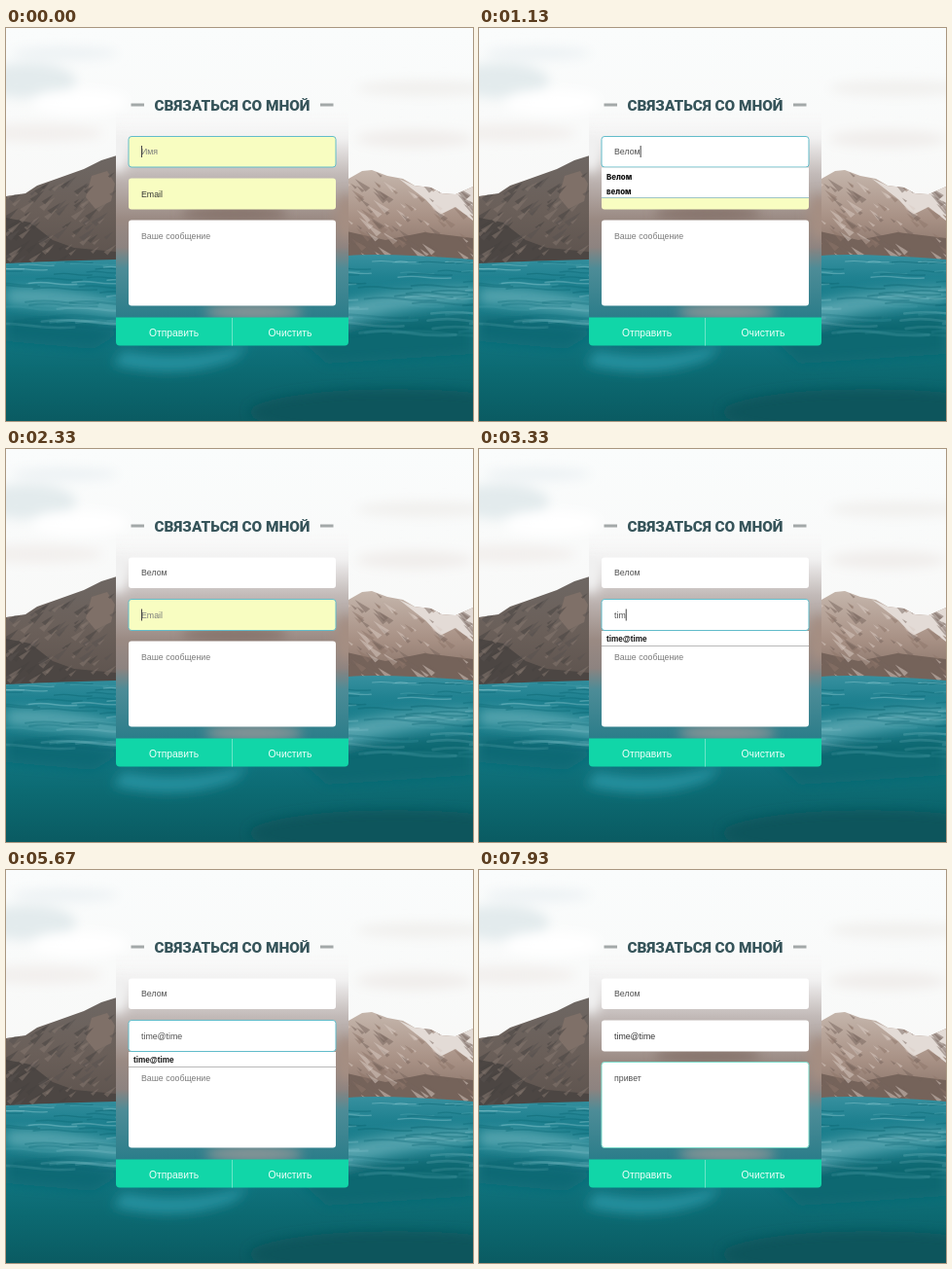
Write an HTML page that moves like this. It is 480 px wide and 404 px high and loops after 8 s.

```html
<!DOCTYPE html>
<html lang="ru">
<head>
<meta charset="utf-8">
<title>Связаться со мной</title>
<style>
html, body { margin: 0; width: 100%; height: 100%; overflow: hidden; background: #fcfcfc; }
svg { display: block; width: 480px; height: 404px; }
text { font: 8.8px "Liberation Sans", Arial, sans-serif; fill: #555; }
.title { font: 800 20px Roboto, "Open Sans", sans-serif; font-stretch: 75%; fill: #36545a; text-anchor: middle; }
.btn { font-size: 10.3px; fill: #effffa; text-anchor: middle; }
.hint { font-weight: 700; font-size: 8.2px; fill: #111; }
.alt { font: 800 7.9px Inter, "Open Sans", sans-serif; }
</style>
</head>
<body>
<svg viewBox="0 0 480 404">
  <defs>
    <linearGradient id="sky" x2="0" y2="1">
      <stop offset="0" stop-color="#fafcfc"/><stop offset=".5" stop-color="#f8f8f7"/><stop offset="1" stop-color="#f4f0ee"/>
    </linearGradient>
    <linearGradient id="sea" x2="0" y2="1">
      <stop offset="0" stop-color="#37909f"/><stop offset=".14" stop-color="#1f8190"/>
      <stop offset=".45" stop-color="#117682"/><stop offset=".7" stop-color="#0c6a72"/><stop offset="1" stop-color="#0a5b62"/>
    </linearGradient>
    <linearGradient id="west" x2="0" y2="1">
      <stop offset="0" stop-color="#6e6763"/><stop offset=".5" stop-color="#6a5f59"/><stop offset="1" stop-color="#5c524d"/>
    </linearGradient>
    <linearGradient id="east" x2="0" y2="1">
      <stop offset="0" stop-color="#c5b6ac"/><stop offset=".5" stop-color="#a89185"/><stop offset="1" stop-color="#7d695f"/>
    </linearGradient>
    <linearGradient id="glass" x2="0" y2="1">
      <stop offset="0" stop-color="#fafafa" stop-opacity="0"/><stop offset=".12" stop-color="#f0efef"/>
      <stop offset=".27" stop-color="#c2bab8"/><stop offset=".46" stop-color="#9a8a83"/>
      <stop offset=".58" stop-color="#8d8380"/><stop offset=".67" stop-color="#4d8c97"/><stop offset=".88" stop-color="#2b7d8a"/>
    </linearGradient>
    <filter id="soft" x="-20%" y="-60%" width="140%" height="220%"><feGaussianBlur stdDeviation="6"/></filter>
    <filter id="haze"><feGaussianBlur stdDeviation=".7"/></filter>
    <clipPath id="westClip"><path id="westShape" d="M0 173 20 170 32 162 52 155 80 145 98 136 114 131 150 150V245H0Z"/></clipPath>
    <clipPath id="eastClip"><path id="eastShape" d="M340 162 352 155 366 147 376 146 392 152 408 155 420 162 437 164 448 170 462 171 480 163V245H340Z"/></clipPath>
    <clipPath id="seaClip"><path id="seaShape" d="M0 242Q60 239 113 238T240 237T352 234T480 238V404H0Z"/></clipPath>
    <clipPath id="paneClip"><rect x="113" y="85" width="239" height="215"/></clipPath>
  </defs>

  <rect width="480" height="404" fill="url(#sky)"/>
  <g filter="url(#soft)">
    <ellipse cx="22" cy="54" rx="50" ry="18" fill="#e3ebed"/>
    <ellipse cx="60" cy="26" rx="55" ry="7" fill="#edf2f4"/>
    <ellipse cx="30" cy="108" rx="70" ry="9" fill="#f2efed"/>
    <ellipse cx="430" cy="62" rx="70" ry="8" fill="#f1f0ee"/>
    <ellipse cx="420" cy="114" rx="60" ry="9" fill="#f0edeb"/>
    <ellipse cx="75" cy="76" rx="50" ry="13" fill="#fff"/>
  </g>
  <use href="#westShape" fill="url(#west)"/>
  <g id="westRock" clip-path="url(#westClip)" filter="url(#haze)">
    <path d="M0 195 25 200 48 218 70 226 113 230V245H0Z" fill="#4c4643"/>
    <path d="M88 152 104 147 112 160 108 178 92 186 82 174Z" fill="#7f7068"/>
  </g>
  <use href="#eastShape" fill="url(#east)"/>
  <g id="eastRock" clip-path="url(#eastClip)" filter="url(#haze)">
    <path d="M404 155 420 162 437 164 448 170 462 171 480 163V198L462 184 446 192 431 176Z" fill="#e3dbd6"/>
    <path d="M350 209 390 218 430 210 480 216V245H350Z" fill="#75635a"/>
  </g>
  <use href="#seaShape" fill="url(#sea)"/>
  <g clip-path="url(#seaClip)">
    <g filter="url(#soft)">
      <path d="M0 268Q60 264 125 284T260 304L200 310Q70 288 0 284Z" fill="#52a3ad"/>
      <path d="M300 296Q380 268 480 266V281Q400 287 320 312Z" fill="#55a3ad"/>
      <path d="M0 298Q70 298 120 312L90 330 0 322Z" fill="#0c6974"/>
      <path d="M300 318Q400 296 480 296V335L330 345Z" fill="#0d6771"/>
      <path d="M120 332Q190 345 250 324L235 340Q180 362 110 346Z" fill="#2692a0"/>
      <ellipse cx="400" cy="395" rx="150" ry="24" fill="#09545b"/>
    </g>
    <g id="waves" fill="none" stroke-linecap="round" filter="url(#haze)"></g>
  </g>

  <g clip-path="url(#paneClip)">
    <rect x="113" y="85" width="239" height="242" fill="url(#glass)"/>
    <g filter="url(#soft)">
      <ellipse cx="255" cy="292" rx="50" ry="9" fill="#879496"/>
      <ellipse cx="114" cy="128" rx="12" ry="20" fill="#f1f1f1"/>
      <ellipse cx="235" cy="191" rx="55" ry="9" fill="#87756d"/>
      <ellipse cx="350" cy="195" rx="12" ry="24" fill="#a58e82"/>
    </g>
  </g>

  <text id="title" class="title" x="232.5">СВЯЗАТЬСЯ СО МНОЙ</text>
  <path d="M128.500 79h13.500M323 79h13.500" stroke="#a3a8a8" stroke-width="3"/>

  <g stroke-width="1">
    <rect id="nameBox" x="126" y="111.500" width="213" height="31.500" rx="3"/>
    <rect id="mailBox" x="126" y="154.500" width="213" height="32" rx="3"/>
    <rect id="noteBox" x="126" y="197.500" width="213" height="88" rx="3"/>
  </g>
  <text id="name" x="139" y="130"></text>
  <text id="mail" x="139" y="173.500"></text>
  <text id="note" x="139" y="217"></text>
  <rect id="caret" width="1" height="12" fill="#444"/>

  <g id="nameList">
    <rect x="126" y="143.500" width="213" height="31" fill="#fff"/>
    <path d="M126 174.500h213" stroke="#9fc5c6"/>
    <text class="hint alt" x="131" y="155.500">Велом</text>
    <text class="hint alt" x="131" y="170.500">велом</text>
  </g>
  <g id="mailList">
    <rect x="126" y="187" width="213" height="15" fill="#fff"/>
    <path d="M126 202.500h213" stroke="#b9b9b9"/>
    <text class="hint" x="131" y="198">time@time</text>
  </g>

  <path d="M113 297.500H352V322.500a4 4 0 0 1-4 4H117a4 4 0 0 1-4-4Z" fill="#11d6a8"/>
  <path d="M232.500 298V326.500" stroke="#6be4c8"/>
  <text class="btn" x="172.500" y="316.500">Отправить</text>
  <text class="btn" x="292" y="316.500">Очистить</text>
</svg>
<script>
const $ = id => document.getElementById(id);
const LOOP = 8000;

// The heading fills the gap between its two dashes, centred on their line.
const titleSize = 20 * 160 / $("title").getComputedTextLength();
$("title").style.fontSize = titleSize + "px";
$("title").setAttribute("y", 79.5 + titleSize * 0.355);

let seed = 11;
const rnd = () => (seed = seed * 16807 % 2147483647) / 2147483647;
const pick = list => list[Math.floor(rnd() * list.length)];

function addPath(parent, attrs) {
  const p = document.createElementNS("http://www.w3.org/2000/svg", "path");
  for (const k in attrs) p.setAttribute(k, attrs[k]);
  parent.append(p);
}

// Ripples are short and dense at the horizon, long and faint near the viewer.
for (let i = 0; i < 150; i++) {
  const depth = rnd() ** 2, w = 20 + 70 * depth + 20 * rnd();
  const x = rnd() * 520 - 30, y = 240 + depth * 75, h = 1 + 3 * depth;
  addPath($("waves"), {
    d: `M${x} ${y}q${w / 4} ${-h} ${w / 2} 0t${w / 2} ${h / 2}`,
    stroke: pick(["#83c1ca", "#0d6672", "#0f6b78", "#4a9eaa"]),
    "stroke-width": 1 + 2 * depth,
    opacity: 0.55 - 0.42 * depth
  });
}

function addRock(id, x0, x1, lean, tones) {
  for (let i = 0; i < 110; i++) {
    const x = x0 + rnd() * (x1 - x0), y = 145 + rnd() * 90, s = 5 + rnd() * 12;
    addPath($(id), {
      d: `M${x} ${y}l${lean * s} ${s * 0.6}l${-lean * s * 0.3} ${s * 0.25}Z`,
      fill: pick(tones), opacity: 0.5
    });
  }
}
addRock("westRock", -10, 115, -1, ["#46413f", "#857870", "#585250"]);
addRock("eastRock", 345, 485, 1, ["#76645b", "#d9ccc4", "#8d766a"]);

// Each row: time, then the text in the field at that time.
const typed = {
  name: [[0, ""], [330, "В"], [470, "Ве"], [600, "Вел"], [730, "Вело"], [870, "Велом"]],
  mail: [[0, ""], [2800, "t"], [2930, "ti"], [3070, "tim"], [3470, "time"], [4400, "time@"],
    [4670, "time@t"], [4800, "time@ti"], [4930, "time@tim"], [5130, "time@time"]],
  note: [[0, ""], [6470, "п"], [6600, "пр"], [6730, "при"], [6930, "прив"], [7200, "приве"], [7400, "привет"]]
};
const labels = { name: "Имя", mail: "Email", note: "Ваше сообщение" };
const focusAt = [[0, "name"], [2000, "mail"], [6000, "note"]];
const caretY = { name: 121, mail: 164.5, note: 208 };
const ring = { name: "#62bcca", mail: "#62bcca", note: "#7edccb" };

const rowAt = (rows, t) => rows.filter(r => r[0] <= t).pop();
const show = (id, on) => $(id).style.display = on ? "" : "none";

function ink(id, value, focus) {
  if (id === "mail" && focus !== id) return "#333";
  return value ? "#505050" : "#7b7b7b";
}

function render(t) {
  const [since, focus] = rowAt(focusAt, t);
  for (const id in typed) {
    const value = rowAt(typed[id], t)[1], el = $(id), box = $(id + "Box");
    const auto = id !== "note" && !value;
    el.textContent = value || labels[id];
    el.style.fill = ink(id, value, focus);
    box.setAttribute("fill", auto ? "#f8fdc1" : "#fff");
    box.setAttribute("stroke", id === focus ? ring[id] : "none");
  }
  const [last, text] = rowAt(typed[focus], t);
  const idle = t - Math.max(since, last);
  show("caret", idle % 1000 < 500);
  $("caret").setAttribute("x", 139 + (text ? $(focus).getComputedTextLength() : 0));
  $("caret").setAttribute("y", caretY[focus]);

  const nameOpen = t >= 330 && t < 1870;
  show("nameList", nameOpen);
  show("mail", !nameOpen);
  show("mailList", t >= 2800 && t < 5930);
}

const start = performance.now();
function tick() {
  render((performance.now() - start) % LOOP);
  requestAnimationFrame(tick);
}
tick();
</script>
</body>
</html>
```
